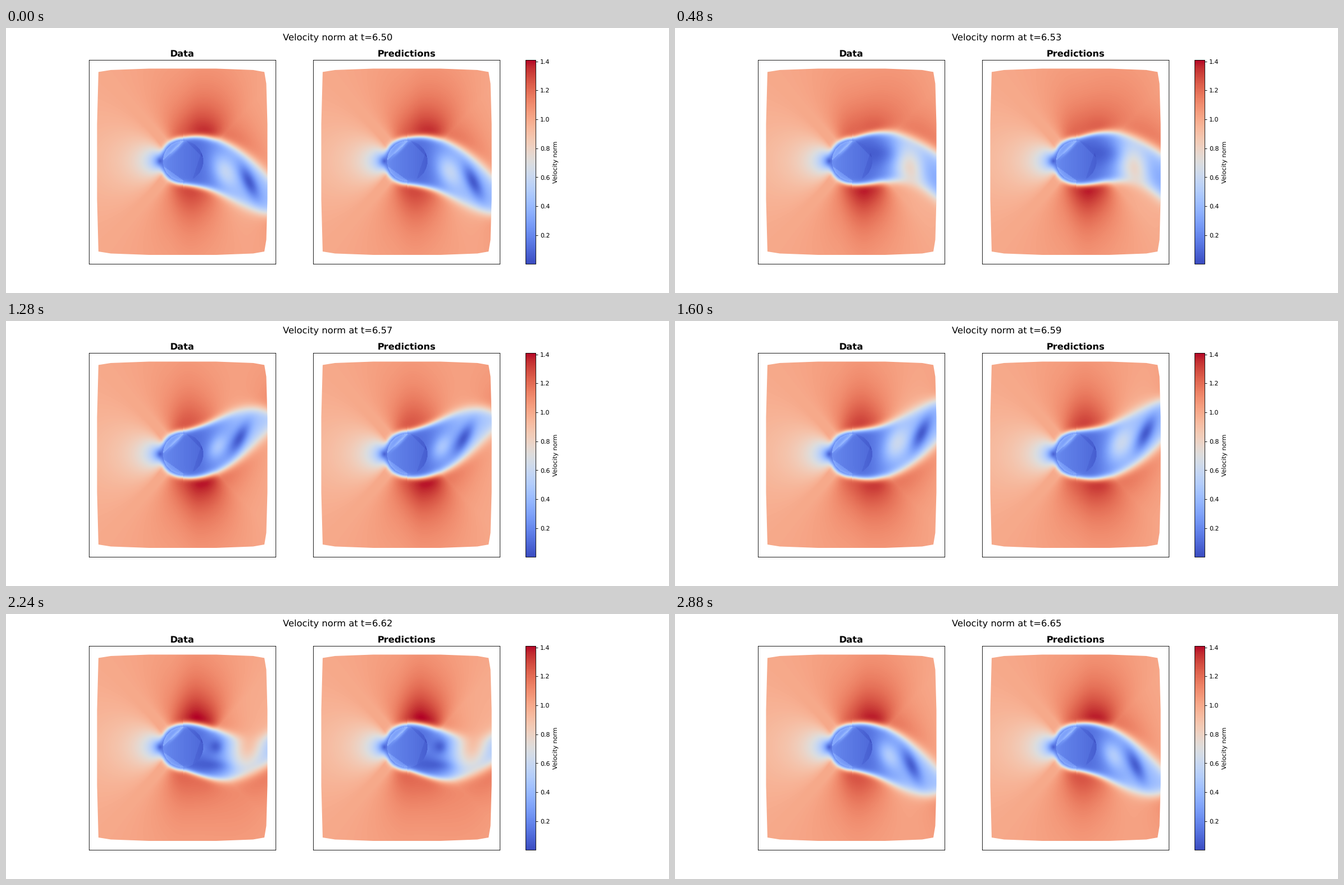
Animation of 1183x473 px, one loop 3040 ms. Source, as a matplotlib script:

```python
import numpy as np
import matplotlib.pyplot as plt
from matplotlib.animation import FuncAnimation
from matplotlib.cm import ScalarMappable
from matplotlib.colors import Normalize
from matplotlib.patches import Polygon

W, H, DPI = 1183, 473, 64
PT = 78.87 / DPI              # point scale of a 15 x 6 inch figure
N, STEP = 19, 160             # one shedding period per loop
HALF = N / 2                  # the two wake sides are half a period apart
CX, CY, R = 316, 238, 36      # cylinder
CMAP, NORM = "coolwarm", Normalize(0.002, 1.411)

X, Y = np.meshgrid(np.arange(160.5, 470), np.arange(70.5, 408))
RAD = np.hypot(X - CX, Y - CY)


def sig(v):
    return 0.5 + 0.5 * np.tanh(v / 2)


def ramp(v, a, b):
    s = np.clip((v - a) / (b - a), 0, 1)
    return s * s * (3 - 2 * s)


def window(v, a, b, c, d):
    return ramp(v, a, b) * (1 - ramp(v, c, d))


def wrap(p, low):
    return (p - low) % N + low


def bump(x, y, a, b, tilt=0):
    t = np.radians(tilt)
    u = (X - x) * np.cos(t) + (Y - y) * np.sin(t)
    v = (Y - y) * np.cos(t) - (X - x) * np.sin(t)
    return np.exp(-0.5 * ((u / a) ** 2 + (v / b) ** 2))


def beyond(ax, ay, bx, by):
    return (bx - ax) * (Y - ay) - (by - ay) * (X - ax) < 0


def potential(cx, radius=40):
    """Speed of ideal flow around a cylinder."""
    dx, dy = X - cx, Y - CY
    r2 = np.maximum(dx ** 2 + dy ** 2, 900)
    q = radius ** 2 / r2
    cos2 = (dx ** 2 - dy ** 2) / r2
    return np.sqrt(np.maximum(1 - 2 * q * cos2 + q * q, 0))


def free_stream():
    slow = np.maximum(1 - potential(CX), 0) * (1 - ramp(X, 300, 360))
    fast = np.maximum(potential(CX + 18) - 1, 0)
    return 1 - slow + 0.24 * np.tanh(fast / 0.24)


def body_field():
    v = 0.2 - 0.1 * (X - 281) / 68
    v += 0.10 * beyond(281, 236, 318, 202)
    v += 0.08 * beyond(320, 275, 282, 248)
    v -= 0.04 * beyond(320, 201, 347, 228)
    v -= 0.03 * beyond(347, 228, 332, 272)
    return v + 0.15 * bump(304, 215, 14, 2.5, -45)


FREE, BODY = free_stream(), body_field()
NEAR_BODY = sig((41 - RAD) / 2.4)
WAKE_BASE = 0.12 + 0.28 * ramp(X, 335, 430)


def upper_edge(phase):
    """Wake border: a skewed wave that grows as it travels downstream."""
    s = np.clip((X[0] - 320) / 146, 0, 1)
    a = 2 * np.pi * (phase - 14.2 - 4.3 * s) / N
    wave = np.cos(a) - 0.25 * s * np.sin(2 * a)
    return 196 - 22 * s + 35 * s ** 2 + 60 * s ** 1.35 * wave


def side_mask(edge, sign):
    width = (2.4 + 3.4 * ramp(X[0], 320, 460)) * np.hypot(1, np.gradient(edge))
    return sig(sign * (Y - edge) / width)


def fast_band(gap, phase):
    """Speed-up beside the wake, carried along with its border."""
    wave = np.cos(2 * np.pi * (phase - 15 - 0.066 * (X - 340)) / N)
    gain = (0.10 + 0.14 * wave) * ramp(X, 290, 345)
    return gain * np.exp(-np.maximum(gap, 0) / 60)


def eddies(v, phase, flip):
    """Vortex core, light pocket and shear layer strip of one wake side."""
    def blend(v, level, weight, x, y, a, b, tilt):
        if flip:
            y, tilt = 2 * CY - y, -tilt
        return v + weight * bump(x, y, a, b, tilt) * (level - v)

    p = wrap(phase, -7)
    v = blend(v, np.clip(0.58 + 0.07 * p, 0.2, 0.92), window(p, -7, -4, 6, 9),
              393 + 9 * p, 240 + 18 * np.exp(-(p - 0.5) ** 2 / 9),
              max(21 + 3 * p, 7), max(13 + 1.7 * p, 6), 62 + 3 * p)
    q = wrap(phase + HALF, 0)
    v = blend(v, 0.06, window(q, 0.5, 3, 6, 8),
              330 + 6.5 * q, 238 + 40 * ramp(q, 1, 6),
              28, 18 - 10 * ramp(q, 2, 4.5), 8 * ramp(q, 3, 6))
    grown, fading = ramp(p, -4.5, -1), ramp(p, 0.5, 4)
    return blend(v, 0.05 + 0.35 * fading, window(p, -7, -5, 3, 6),
                 434 + 12 * p, 237 + 38 * ramp(p, -4.5, 0),
                 9 + 15 * grown + 8 * fading, 9 + 7 * fading, 65 * grown)


def speed(i):
    top, low = upper_edge(i), 2 * CY - upper_edge(i + HALF)
    above = sig(((top + low) / 2 - Y) / 8)
    outer = FREE + above * fast_band(top - Y, i)
    outer += (1 - above) * fast_band(Y - low, i + HALF)
    inner = eddies(eddies(WAKE_BASE, i, False), i + HALF, True)
    inner = np.where(RAD < R, BODY, inner)
    wake = side_mask(top, 1) * side_mask(low, -1) * (X >= CX)
    mix = np.maximum(wake, NEAR_BODY)
    return np.clip(outer + (inner - outer) * mix, 0, 1.411)


def outline():
    lower = [(466.5, 306), (464.5, 378), (461, 399), (441, 402.5), (375, 405),
             (255, 405), (187, 402.5), (165, 399), (162.5, 306)]
    return lower + [(x, 477.5 - y) for x, y in reversed(lower)]


plt.rcParams.update({
    "font.family": "DejaVu Sans", "font.size": 10 * PT,
    "text.hinting": "no_hinting",
    "axes.linewidth": 0.8 * PT, "axes.titlepad": 5.5 * PT,
    "axes.labelpad": 4 * PT,
    "ytick.major.size": 3.5 * PT, "ytick.major.width": 0.8 * PT,
    "ytick.major.pad": 3.5 * PT,
})
fig, axes = plt.subplots(1, 2, figsize=(W / DPI, H / DPI), dpi=DPI)
fig.colorbar(ScalarMappable(NORM, CMAP), ax=axes, label="Velocity norm")
title = fig.suptitle("", y=0.979, fontsize=15 * PT)

images = []
for ax, name in zip(axes, ("Data", "Predictions")):
    im = ax.imshow(FREE, cmap=CMAP, norm=NORM, extent=(160, 470, 408, 70),
                   aspect="auto", interpolation="bilinear")
    ax.set(xlim=(147.9, 481.3), ylim=(421, 56.8), xticks=[], yticks=[])
    ax.set_title(name, fontsize=15 * PT, fontweight="bold")
    im.set_clip_path(Polygon(outline(), transform=ax.transData))
    images.append(im)


def draw(i):
    field = speed(i)
    for im in images:
        im.set_data(field)
    title.set_text(f"Velocity norm at t={6.503 + i / 120:.2f}")
    return [*images, title]


anim = FuncAnimation(fig, draw, frames=N, interval=STEP,
                     init_func=lambda: draw(0), repeat=True, repeat_delay=0)
plt.show()
```
